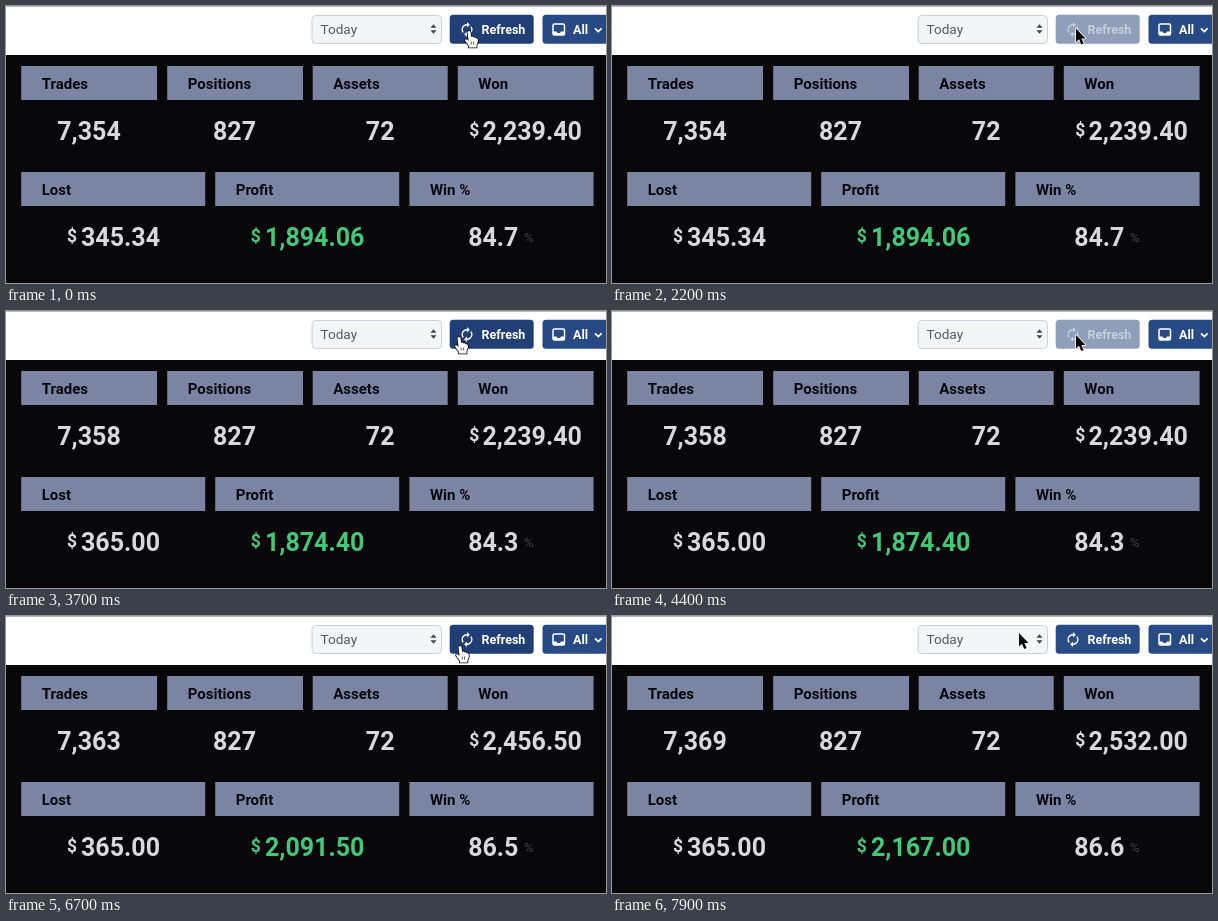
Animation of 600x277 px, one loop 8 s. Source, as an HTML page with a canvas:

```html
<!DOCTYPE html>
<html lang="en">
<head>
<meta charset="utf-8">
<title>Trading dashboard</title>
<style>
html, body { margin: 0; width: 100%; height: 100%; overflow: hidden; background: #fff; }
canvas { display: block; }
</style>
</head>
<body>
<canvas id="stage" width="600" height="277"></canvas>
<script>
const ctx = document.getElementById('stage').getContext('2d');
const LOOP = 8000, STEP = 100;

// Figures shown from the given time on.
const states = [
  { at: 0,    trades: '7,354', won: '2,239.40', lost: '345.34', profit: '1,894.06', rate: '84.7' },
  { at: 2400, trades: '7,358', won: '2,239.40', lost: '365.00', profit: '1,874.40', rate: '84.3' },
  { at: 4800, trades: '7,363', won: '2,456.50', lost: '365.00', profit: '2,091.50', rate: '86.5' },
  { at: 7400, trades: '7,369', won: '2,532.00', lost: '365.00', profit: '2,167.00', rate: '86.6' }
];
const loading = [[1700, 2400], [4100, 4800], [6800, 7400]];

// Pointer tip: time, x, y.
const path = [
  [0, 463, 25], [700, 463, 25], [1300, 466, 29], [1400, 466, 29], [1600, 464, 24],
  [1900, 464, 22.5], [3100, 464, 22.5], [3600, 453, 26], [3700, 453, 26], [4000, 464, 24],
  [6000, 464, 24], [6500, 454, 30], [6700, 454, 30], [7000, 453, 26],
  [7400, 453, 26], [7900, 407, 17]
];

const clamp = v => Math.max(0, Math.min(1, v));
const smooth = v => v * v * (3 - 2 * v);

function pointerAt(t) {
  const i = path.findIndex(p => p[0] > t);
  if (i < 0) return path[path.length - 1].slice(1);
  const [t0, x0, y0] = path[i - 1], [t1, x1, y1] = path[i];
  const k = smooth((t - t0) / (t1 - t0));
  return [x0 + (x1 - x0) * k, y0 + (y1 - y0) * k];
}

function fadeAt(t) {
  return Math.max(...loading.map(([a, b]) =>
    t < b ? clamp((t - a + STEP) / 200) : clamp(1 - (t - b + STEP) / 200)));
}

function box(x, y, w, h, r, fill, stroke) {
  ctx.beginPath();
  ctx.roundRect(x, y, w, h, r);
  ctx.fillStyle = fill;
  ctx.fill();
  if (stroke) {
    ctx.strokeStyle = stroke;
    ctx.lineWidth = 1;
    ctx.stroke();
  }
}

function text(str, x, y, size, color, weight = 600, align = 'left') {
  ctx.font = `${weight} ${size}px Roboto, sans-serif`;
  ctx.textAlign = align;
  ctx.fillStyle = color;
  ctx.fillText(str, x, y);
}

function line(points, color, width) {
  ctx.beginPath();
  points.forEach(([x, y]) => ctx.lineTo(x, y));
  ctx.strokeStyle = color;
  ctx.lineWidth = width;
  ctx.stroke();
}

function shape(points, color) {
  ctx.beginPath();
  points.forEach(([x, y]) => ctx.lineTo(x, y));
  ctx.closePath();
  ctx.fillStyle = color;
  ctx.fill();
}

function card(label, x, y, w, value, center, color = '#d9d9db') {
  box(x, y, w, 34, 0, '#7c84a3');
  text(label, x + 20.5, y + 22.5, 15, '#07080e');
  text(value, center, y + 74, 25, color, 600, 'center');
}

function syncIcon(x, y) {
  ctx.save();
  ctx.translate(x, y);
  for (let i = 0; i < 2; i++) {
    ctx.beginPath();
    ctx.arc(0, 0, 4.8, 0.8 * Math.PI, 1.5 * Math.PI);
    ctx.strokeStyle = '#fff';
    ctx.lineWidth = 1.5;
    ctx.stroke();
    shape([[0, -7.6], [2.8, -4.8], [0, -2]], '#fff');
    ctx.rotate(Math.PI);
  }
  ctx.restore();
}

function toolbar(t) {
  ctx.fillStyle = '#fff';
  ctx.fillRect(0, 0, 600, 49);
  ctx.fillStyle = '#b5b5b7';
  ctx.fillRect(0, 0, 600, 1);

  box(306, 9.5, 129.5, 28, 4, '#f4f5f7', '#ccd0d6');
  text('Today', 314.5, 27.5, 13.6, '#55595f', 400);
  shape([[424.5, 21.8], [430.5, 21.8], [427.5, 18.3]], '#3f4247');
  shape([[424.5, 24.2], [430.5, 24.2], [427.5, 27.7]], '#3f4247');

  const hover = t < 7500;
  ctx.save();
  ctx.globalAlpha = 1 - 0.5 * fadeAt(t);
  box(443.7, 8.7, 84, 29, 3.5, hover ? '#213f74' : '#294c86');
  syncIcon(461, 23.5);
  text('Refresh', 475.5, 27.7, 12.5, '#fff');
  ctx.restore();

  box(536.5, 8.7, 70, 29, 3.5, '#274a84');
  ctx.beginPath();
  ctx.roundRect(547, 18, 11.5, 11, 1.5);
  ctx.strokeStyle = '#fff';
  ctx.lineWidth = 1.5;
  ctx.stroke();
  shape([[547, 25.5], [550.5, 25.5], [551.5, 27], [554, 27], [555, 25.5], [558.5, 25.5], [558.5, 29], [547, 29]], '#fff');
  text('All', 567, 27.7, 12.5, '#fff');
  line([[589, 22.3], [592.3, 25.6], [595.6, 22.3]], '#fff', 1.7);
}

function dashboard(s) {
  ctx.fillStyle = '#080709';
  ctx.fillRect(0, 49, 600, 228);
  card('Trades', 15.2, 60, 135.8, s.trades, 83);
  card('Positions', 161.2, 60, 135.8, '827', 228.5);
  card('Assets', 306.7, 60, 135, '72', 374.2);
  card('Won', 451.8, 60, 135.8, s.won, 526.2);
  card('Lost', 15.2, 166, 184, s.lost, 114.5);
  card('Profit', 209.2, 166, 184, s.profit, 308.7, '#42c878');
  card('Win %', 403.4, 166, 184.2, s.rate, 487.3);
  text('$', 463.3, 130, 17.5, '#d9d9db');
  text('$', 61, 236, 17.5, '#d9d9db');
  text('$', 244.8, 236, 17.5, '#42c878');
  text('%', 518, 236, 13, '#434347', 400);
}

function outlined(d, fill, stroke, width) {
  const p = new Path2D(d);
  ctx.lineJoin = 'round';
  ctx.strokeStyle = stroke;
  ctx.lineWidth = width;
  ctx.stroke(p);
  ctx.fillStyle = fill;
  ctx.fill(p);
}

function pointer(t) {
  const [x, y] = pointerAt(t);
  const arrow = t >= 7500 || loading.some(([a, b]) => t >= a && t < b);
  ctx.save();
  ctx.translate(x, y);
  if (arrow) {
    outlined('M0 0V13.5L3 10.8L5.2 16L7.6 15L5.4 10H9.5Z', '#050505', '#fff', 1.6);
  } else {
    outlined('M-1.5 1Q0 -1 1.5 1L2.2 6Q3.8 5 4.6 6.5Q6 5.8 6.8 7.2Q8.6 6.8 8.8 8.6V11L7.5 14V16.5H-.2V14.5L-4 9.6Q-3.6 7.6-1.8 8.8L-.4 10Z', '#fff', '#111', 1.7);
    line([[2.2, 10.5], [2.2, 13.5]], '#333', 0.8);
    line([[4.6, 10.5], [4.6, 13.5]], '#333', 0.8);
  }
  ctx.restore();
}

function draw(now) {
  const t = Math.floor((now % LOOP) / STEP) * STEP;
  toolbar(t);
  dashboard(states.filter(s => s.at <= t).pop());
  pointer(t);
}

const start = performance.now();
function tick() {
  draw(performance.now() - start);
  requestAnimationFrame(tick);
}
tick();
</script>
</body>
</html>
```
